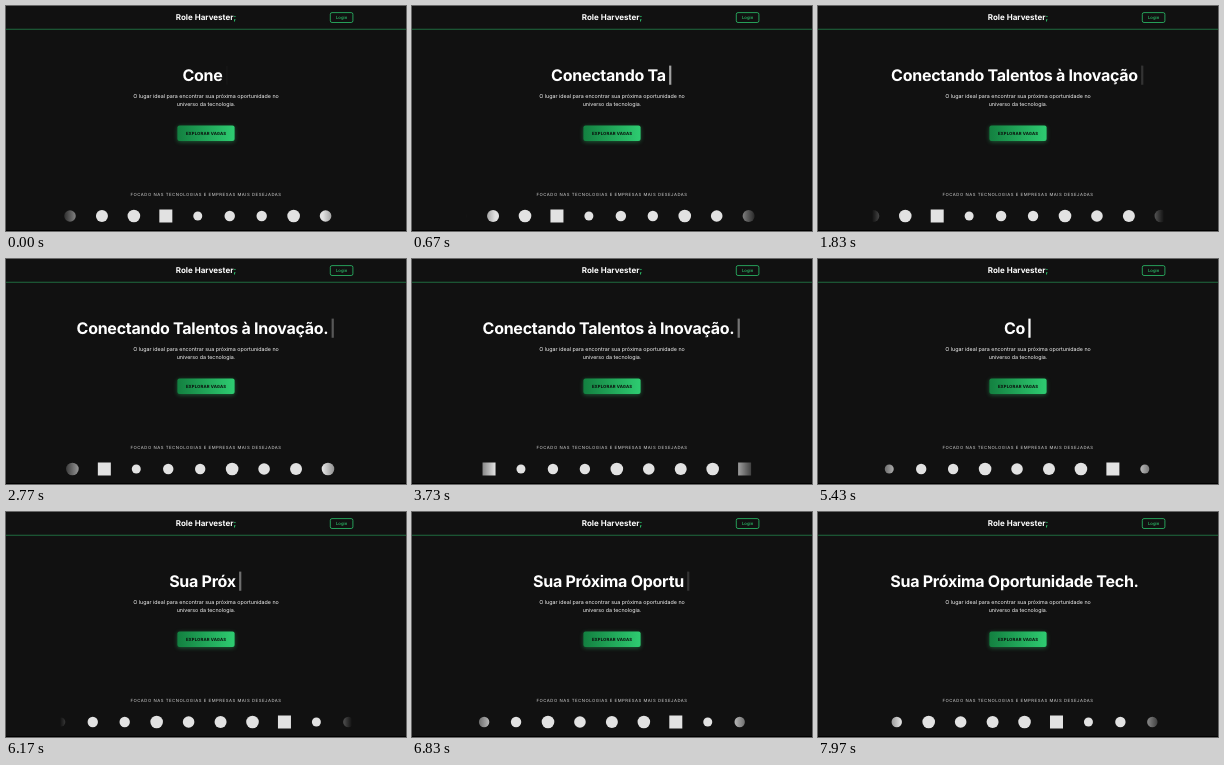
An HTML page for the animation above (8 s loop, 400 by 225 pixels).

```html
<!DOCTYPE html>
<html lang="pt-BR">
<head>
<meta charset="utf-8">
<title>Vagas</title>
<style>
  html, body { margin: 0; width: 100%; height: 100%; overflow: hidden; background: #111; }
  svg { display: block; width: 100%; height: 100%; }
  text { font-family: Inter, sans-serif; font-size: 4.27px; text-anchor: middle; text-rendering: geometricPrecision; }
  .brand { font-size: 8px; font-weight: 700; fill: #fff; }
  .green { fill: #2ecc71; }
  .login { font-weight: 500; }
  .headline { font-size: 16px; font-weight: 700; letter-spacing: -.267px; fill: #fff; white-space: pre; }
  .lead { font-size: 5.33px; fill: #f5f5f5; }
  .cta { font-weight: 700; letter-spacing: .107px; fill: #0a0a0a; }
  .focus { letter-spacing: .533px; fill: #d4d4d4; }
  .button { filter: drop-shadow(0 1.2px 2px rgba(46, 204, 113, .4)); }
</style>
</head>
<body>
<svg viewBox="0 0 400 225">
  <defs>
    <linearGradient id="cta">
      <stop offset="0" stop-color="#138040"/>
      <stop offset="1" stop-color="#2ecc71"/>
    </linearGradient>
    <linearGradient id="fade">
      <stop offset="0" stop-color="#fff" stop-opacity="0"/>
      <stop offset=".1" stop-color="#fff"/>
      <stop offset=".9" stop-color="#fff"/>
      <stop offset="1" stop-color="#fff" stop-opacity="0"/>
    </linearGradient>
    <mask id="edges" maskUnits="userSpaceOnUse" x="54" y="198" width="292" height="24">
      <rect x="54" y="198" width="292" height="24" fill="url(#fade)"/>
    </mask>
  </defs>

  <text class="brand" x="200" y="14.4">Role Harvester<tspan class="green">;</tspan></text>
  <rect x="324.3" y="6.6" width="22.6" height="9.9" rx="1.7" fill="none" stroke="#2ecc71" stroke-width=".75"/>
  <text class="login green" x="335.6" y="13.1">Login</text>
  <rect class="green" y="22.8" width="400" height=".8" opacity=".6"/>

  <text class="headline" x="200" y="75"><tspan id="typed"></tspan><tspan id="cursor" dx="1.33">|</tspan></text>
  <text class="lead" x="200" y="91.8">O lugar ideal para encontrar sua próxima oportunidade no</text>
  <text class="lead" x="200" y="100.4">universo da tecnologia.</text>
  <rect class="button" x="171.4" y="119.5" width="57.2" height="15.5" rx="2.1" fill="url(#cta)"/>
  <text class="cta" x="200" y="128.8">EXPLORAR VAGAS</text>

  <text class="focus" x="200" y="190.1">FOCADO NAS TECNOLOGIAS E EMPRESAS MAIS DESEJADAS</text>
  <g mask="url(#edges)"><g id="track" fill="#e2e2e2"></g></g>
  <rect y="224" width="400" height="1"/>
</svg>
<script>
  const LOOP = 8000, STEP = 31.95, SPEED = 0.0222;
  const FIRST = 'Conectando Talentos à Inovação.';
  const SECOND = 'Sua Próxima Oportunidade Tech.';
  const TYPE_MS = 70, DELETE_MS = 50;
  const DELETE_AT = 3945, SECOND_AT = 5545;
  const BLINK_MS = 1000, BLINK_LEAD = 45;
  const $ = id => document.getElementById(id);
  const typed = $('typed'), cursor = $('cursor'), track = $('track');

  // Half sizes of the eight badges; the fourth one is square
  const sizes = [5.8, 6, 6.3, 6.5, 4.5, 5.2, 5.2, 6.3];
  for (let i = 0; i < 16; i++) {
    const k = i % 8, r = sizes[k];
    const badge = document.createElementNS('http://www.w3.org/2000/svg', 'rect');
    const attrs = { x: 64 + i * STEP - r, y: 210 - r, width: 2 * r, height: 2 * r, rx: k === 3 ? 0 : r };
    for (const name in attrs) badge.setAttribute(name, attrs[name]);
    track.append(badge);
  }

  function headline(t) {
    if (t < DELETE_AT) return FIRST.slice(0, 4 + Math.floor((t + 15) / TYPE_MS));
    if (t < SECOND_AT) {
      const left = FIRST.length - Math.floor((t - DELETE_AT) / DELETE_MS);
      return FIRST.slice(0, Math.max(0, left));
    }
    return SECOND.slice(0, Math.floor((t - SECOND_AT) / TYPE_MS));
  }

  function draw() {
    const t = performance.now() % LOOP;
    const blink = (t + BLINK_LEAD) / BLINK_MS * 2 * Math.PI;
    typed.textContent = headline(t);
    cursor.setAttribute('fill-opacity', (1 - Math.cos(blink)) / 2);
    track.setAttribute('transform', `translate(${-t * SPEED} 0)`);
    requestAnimationFrame(draw);
  }
  draw();
</script>
</body>
</html>
```
